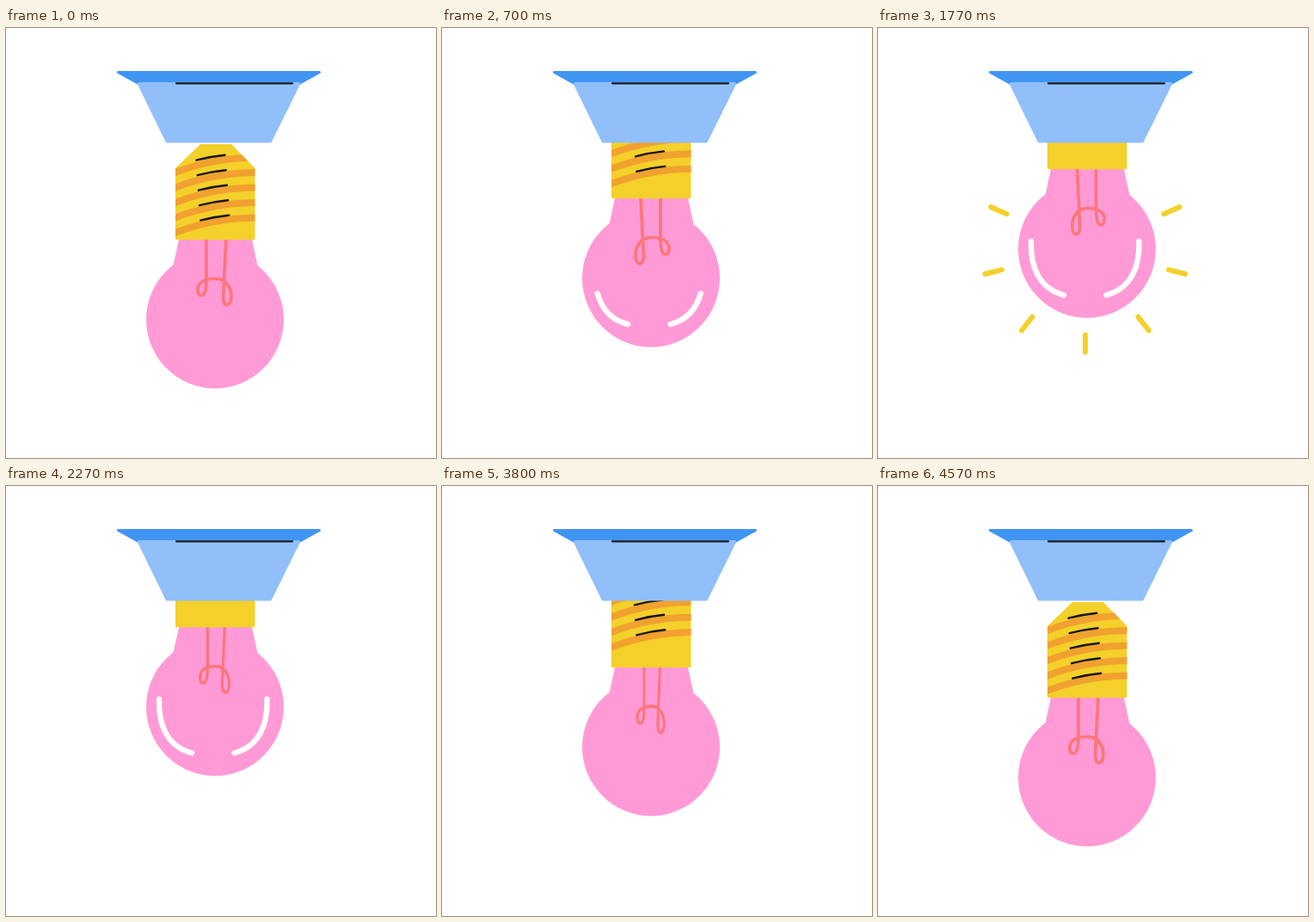
An HTML page for the animation above (5230 ms loop, 500 by 500 pixels).

```html
<!DOCTYPE html>
<html lang="en">
<head>
<meta charset="utf-8">
<title>Light bulb</title>
<style>
  html, body { margin: 0; width: 100%; height: 100%; overflow: hidden; background: #fff; }
  svg { display: block; width: 100vw; height: 100vh; }
  .line { fill: none; stroke-linecap: round; stroke-linejoin: round; }
  .stripe { stroke: #f1a12f; stroke-width: 8; }
  .dash { stroke: #17150f; stroke-width: 2.4; }
  .shine { stroke: #fff; stroke-width: 6.4; }
  .ray { stroke: #f4d02a; stroke-width: 6; }
  .wire { stroke: #ff7577; stroke-width: 3.7; }
  .glass { fill: #ff9ad7; }
</style>
</head>
<body>
<svg viewBox="0 0 500 500">
  <defs>
    <clipPath id="cap"><path d="M226 135H262L289.5 163V245L288.500 246.300H198L197 245V163Z"/></clipPath>
  </defs>
  <g id="rays"></g>
  <g id="bulb">
    <path class="glass" d="M201.500 244H285.500L292.500 276H194.500Z"/>
    <circle class="glass" cx="243" cy="339" r="80"/>
    <path id="wire" class="line wire" d="M233 244V292C233 306 231 311 227.500 311C222.500 311 221 303 225.500 297C230 292.500 236 291.500 243 291.500C256 291.500 262 302 262 312C262 318 260 322 257 322C253 322 252 316 253 305L256 244"/>
    <path class="line shine" pathLength="1" d="M216 392.500C187 385 177 359 178 330"/>
    <path class="line shine" pathLength="1" d="M216 392.500C187 385 177 359 178 330" transform="matrix(-1 0 0 1 481.500 0)"/>
    <g clip-path="url(#cap)">
      <path fill="#f4d02a" d="M190 130H300V250H190Z"/>
      <g id="thread"></g>
    </g>
  </g>
  <path fill="#4095f3" stroke="#4095f3" stroke-width="3" stroke-linejoin="round" d="M130.500 51.500H364.500L341 64.500H154Z"/>
  <path fill="#90bffa" stroke="#90bffa" stroke-width="4" stroke-linejoin="round" d="M155 65H340L307 131.500H187.500Z"/>
  <path class="line" stroke="#17181c" stroke-width="2.200" d="M198 64.300H333"/>
</svg>
<script>
  const LOOP = 5230, STEP = 200 / 3, BEAT = 700;
  const $ = id => document.getElementById(id);

  // Progress 0..1 from t0 to t1: power > 1 starts slowly.
  const ramp = (t, t0, t1, power = 1) =>
    Math.min(1, Math.max(0, (t - t0) / (t1 - t0))) ** power;

  function addLine(parent, cls, d) {
    const p = document.createElementNS("http://www.w3.org/2000/svg", "path");
    p.setAttribute("class", "line " + cls);
    if (d) p.setAttribute("d", d);
    parent.appendChild(p);
    return p;
  }

  for (let i = 0; i < 5; i++) {
    const y = 150.5 + i * 17.5, x = 221.5 + i * 1.2;
    addLine($("thread"), "stripe", `M193 ${y + 19}Q240 ${y} 294 ${y}`);
    addLine($("thread"), "dash", `M${x} ${y + 3.2}q17 -4.5 33 -6`);
  }

  const rays = Array.from({ length: 7 }, (_, i) => ({
    angle: (90 + (i - 3) * 38) * Math.PI / 180,
    path: addLine($("rays"), "ray")
  }));
  const shines = document.querySelectorAll(".shine");

  // Ten poses per beat, the last one held longer.
  function held(t) {
    const s = t - 96, beat = Math.floor(s / BEAT) * BEAT;
    return 100 + beat + Math.min(9, Math.floor((s - beat) / STEP)) * STEP;
  }

  function drawBulb(t) {
    const out = ramp(t, 3100, 4330);
    const lift = 48 * ramp(t, 100, 700) + 34 * (1 - (1 - ramp(t, 700, 1700)) ** 1.18) - 82 * out;
    const slide = 35 * (ramp(t, 100, 1700, 1.4) - out);
    const turns = 1.92 * (ramp(t, 100, 2270, 1.05) - ramp(t, 3100, 4570, 1.15));
    const sx = Math.cos(turns * 2 * Math.PI);
    $("bulb").setAttribute("transform", `translate(0 ${-lift})`);
    $("thread").setAttribute("transform", `translate(0 ${-slide})`);
    $("wire").setAttribute("transform", `translate(243.5 0) scale(${sx} 1) translate(-243.5 0)`);
  }

  function drawShines(t) {
    const from = ramp(t, 3100, 3600), len = ramp(t, 370, 870) - from;
    for (const s of shines) {
      s.style.visibility = len > 0.01 ? "visible" : "hidden";
      s.setAttribute("stroke-dasharray", `${len} 3`);
      s.setAttribute("stroke-dashoffset", -from);
    }
  }

  function drawRays(t) {
    const r0 = 100 + 90 * ramp(t, 1900, 2260), r1 = 100 + 90 * ramp(t, 1700, 2000);
    $("rays").style.visibility = r1 - r0 > 0.5 ? "visible" : "hidden";
    for (const { angle, path } of rays) {
      const c = Math.cos(angle), s = Math.sin(angle);
      path.setAttribute("d", `M${241 + r0 * c} ${257 + r0 * s}L${241 + r1 * c} ${257 + r1 * s}`);
    }
  }

  const start = performance.now();
  function tick() {
    const t = held((performance.now() - start) % LOOP);
    drawBulb(t);
    drawShines(t);
    drawRays(t);
    requestAnimationFrame(tick);
  }
  tick();
</script>
</body>
</html>
```
